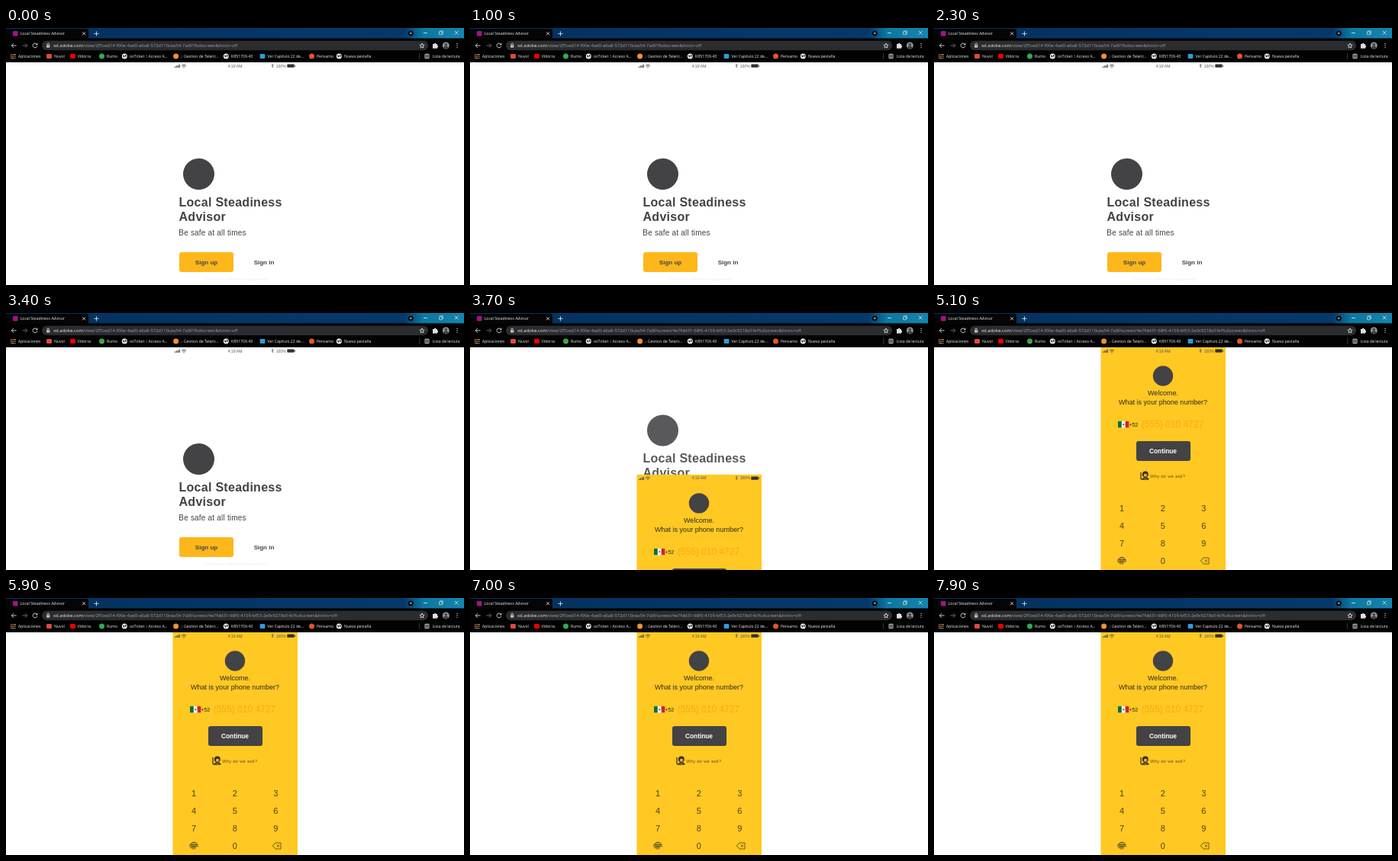
These frames come from a looping animation (600x337 px, 8000 ms). An HTML page:

```html
<!DOCTYPE html>
<html lang="en">
<head>
<meta charset="utf-8">
<title>App prototype</title>
<style>
html, body { margin: 0; width: 100%; height: 100%; overflow: hidden; background: #fff; }
svg { display: block; width: 100vw; height: 100vh; }
text { font-family: "Liberation Sans", Arial, sans-serif; }
.ui text { font: 5.1px "Open Sans", sans-serif; fill: #eee; }
.ui #url { font-size: 5.9px; fill: #9aa0a6; }
.line { fill: none; stroke: #ddd; stroke-width: .9; }
.mid { text-anchor: middle; }
.bold { font-weight: bold; font-size: 8px; }
</style>
</head>
<body>
<svg viewBox="0 0 600 337">
  <defs>
    <linearGradient id="strip">
      <stop offset="0" stop-color="#04315f"/>
      <stop offset=".87" stop-color="#05396b"/>
      <stop offset=".91" stop-color="#0b78a3"/>
      <stop offset="1" stop-color="#1584ae"/>
    </linearGradient>
    <clipPath id="page"><rect y="45" width="600" height="292"/></clipPath>
    <clipPath id="phone"><rect x="218.5" y="45" width="163.5" height="300"/></clipPath>
    <g id="status" fill="#555">
      <path d="M221 52v-1.5h1.3V52zm1.9 0v-2.4h1.3V52zm1.9 0v-3.2h1.3V52zm1.9 0v-4.2h1.3V52z"/>
      <path d="M230 49.3q3-2.9 6 0M231.2 50.5q1.8-1.7 3.6 0" fill="none" stroke="#555" stroke-width=".9"/>
      <circle cx="233" cy="51.7" r=".7"/>
      <text class="mid" x="300" y="51.6" font-size="5.2">4:19 AM</text>
      <path d="M347.8 48.3l2.6 2.4-1.3 1.2v-5l1.3 1.2-2.6 2.4" fill="none" stroke="#555" stroke-width=".6"/>
      <text x="353.8" y="51.6" font-size="5">100%</text>
      <rect x="368.3" y="47.6" width="9.4" height="4.2" rx=".8" fill="#333"/>
      <rect x="378.2" y="48.8" width=".9" height="1.8" fill="#333"/>
    </g>
  </defs>
  <rect width="600" height="337" fill="#fff"/>

  <g clip-path="url(#page)">
    <g id="start" fill="#434345">
      <use href="#status"/>
      <circle cx="252.5" cy="191.5" r="20.5"/>
      <g font-size="16" font-weight="bold" letter-spacing=".28">
        <text x="226.5" y="233.5">Local Steadiness</text>
        <text x="226.5" y="252.5">Advisor</text>
      </g>
      <text x="226.3" y="272" font-size="10" letter-spacing=".2">Be safe at all times</text>
      <rect x="227" y="294" width="71" height="26" rx="3" fill="#fdb71a"/>
      <text class="mid bold" x="262.5" y="309.5">Sign up</text>
      <text class="mid bold" x="338" y="309.5">Sign in</text>
      <text class="mid" x="301" y="331" font-size="6" letter-spacing=".3" fill="#ececec">Continue without registering</text>
    </g>

    <g id="login" fill="#2c2a25">
      <rect x="218.5" y="45" width="163.5" height="300" fill="#ffc822"/>
      <use href="#status" clip-path="url(#phone)"/>
      <circle cx="300" cy="82.5" r="13.2" fill="#434345"/>
      <text class="mid" x="300" y="108" font-size="9.05">Welcome.</text>
      <text class="mid" x="300" y="120" font-size="9.05">What is your phone number?</text>
      <rect x="241" y="142" width="14.4" height="8.4" fill="#fff"/>
      <rect x="241" y="142" width="4.8" height="8.4" fill="#08703f"/>
      <rect x="250.6" y="142" width="4.8" height="8.4" fill="#d4202c"/>
      <circle cx="248.2" cy="146.2" r="1.2" fill="#77714a"/>
      <text x="255.4" y="148.7" font-size="7">+52</text>
      <text x="271.7" y="150" font-size="12" fill="#f9a91b">(555) 010 4727</text>
      <rect x="265" y="168" width="71" height="26" rx="3" fill="#434345"/>
      <text class="mid bold" x="300" y="183.6" style="font-size:8.3px;fill:#fff">Continue</text>
      <g stroke="#33281c" fill="none">
        <path d="M271 209v7.5q0 1.7 2 1.7h8" stroke-width="1.2"/>
        <circle cx="276.8" cy="211.5" r="3.9" fill="#33281c" stroke="none"/>
        <circle cx="277" cy="212.6" r="2.2" fill="#e7a93a" stroke="none"/>
        <path d="M273 218q4-4 8.4 0" stroke-width="1.3"/>
      </g>
      <text x="283" y="215.8" font-size="6" letter-spacing=".16" fill="#66521d">Why do we ask?</text>
      <g id="keys" class="mid" font-size="11" fill="#4b4127"></g>
      <g fill="none" stroke="#4b4127" stroke-width=".8">
        <path d="M353 321h7v8h-7l-3.6-4zm1.8 2.3l3.2 3.4m0-3.4l-3.2 3.4"/>
        <path d="M241 327a5.3 5.3 0 1 1 10.3-.5M242.6 328.5q0-7.8 3.4-7.8t3.4 5.6M244.3 329.5q0-6.8 1.7-6.8t1.7 6.8M246 324.5v5M240.8 323.5h10M242 326h8.5"/>
      </g>
    </g>
  </g>

  <g class="ui">
    <rect width="600" height="45" fill="#020202"/>
    <rect width="600" height="13.5" fill="url(#strip)"/>
    <path d="M0 14V1h105q3 0 3 3v10z" fill="#050506"/>
    <rect x="9" y="4" width="6.5" height="6.5" rx="1" fill="#a3128a"/>
    <text x="18.7" y="9.2">Local Steadiness Advisor</text>
    <g class="line">
      <path d="M100 5.3l4 4m0-4l-4 4M118.5 4.4v6m-3-3h6"/>
      <path d="M547 6.5h5M588 4l4.4 4.4m0-4.4L588 8.4"/>
      <path d="M567.5 5h3.7v3.7h-3.7zM568.7 5V3.8h3.7v3.7h-1.2" stroke-width=".7"/>
      <path d="M13.5 23H7.2m2.8-2.8L7.2 23l2.8 2.8"/>
      <path d="M21.5 23h6.3m-2.8-2.8l2.8 2.8-2.8 2.8" stroke="#777"/>
      <path d="M40.5 21.4a2.9 2.9 0 1 0 .4 2.2M41 19.8v2.1h-2.2"/>
    </g>
    <circle cx="530.3" cy="7" r="3.6" fill="#0a1016"/>
    <path d="M528.7 6.2h3.2l-1.6 2z" fill="#ddd"/>
    <rect x="47" y="16.8" width="506" height="12.4" rx="6.2" fill="#2b2c2f"/>
    <path d="M53 22.3h4.4v3.4H53z" fill="#bbb"/>
    <path class="line" d="M54 22.3v-1a1.2 1.2 0 0 1 2.4 0v1" stroke-width=".7"/>
    <text id="url" x="62" y="25.1"><tspan fill="#eee">xd.adobe.com</tspan><tspan id="path"></tspan></text>
    <path class="line" d="M545 20l.9 2.1 2.2.2-1.7 1.5.5 2.2-1.9-1.2-1.9 1.2.5-2.2-1.7-1.5 2.2-.2z" stroke-width=".7"/>
    <path d="M559 21h2a1.2 1.2 0 0 1 2.4 0h1.6v2a1.2 1.2 0 0 1 0 2.4v1.3h-6z" fill="#ddd"/>
    <circle cx="576.3" cy="23" r="4.5" fill="#8d9496"/>
    <path d="M573 26q.5-2.4 3.3-2.4t3.3 2.4a4.5 4.5 0 0 1-6.6 0z" fill="#3b4143"/>
    <circle cx="576.3" cy="21.8" r="1.7" fill="#3b4143"/>
    <g fill="#ddd"><circle cx="591" cy="20.4" r=".7"/><circle cx="591" cy="23" r=".7"/><circle cx="591" cy="25.6" r=".7"/></g>
    <g id="marks"></g>
    <path d="M541.7 33v8" stroke="#555" stroke-width=".7"/>
    <path class="line" d="M549 34.3h5v5.4h-5zM550 36h3m-3 2h3" stroke-width=".8"/>
    <text x="558.7" y="38.8">Lista de lectura</text>
  </g>
</svg>
<script>
const $ = id => document.getElementById(id);

$("keys").innerHTML = [..."1234567890"].map((key, i) => {
  const col = key === "0" ? 1 : i % 3;
  return `<text x="${246 + col * 53.7}" y="${260 + Math.floor(i / 3) * 23}">${key}</text>`;
}).join("");

const dots = ["#e8453c", "#e8453c", "#f2b90f", "#4a8df0", "#e8453c", "#3ba55c", "#e8453c", "#f2b90f", "#4a8df0"]
  .map((c, i) => `<rect x="${6 + i % 3 * 2.4}" y="${34 + Math.floor(i / 3) * 2.4}" width="1.6" height="1.6" fill="${c}"/>`).join("");
const disc = (x, c) => `<circle cx="${x}" cy="37" r="3.5" fill="${c}"/>`;
const box = (x, c) => `<rect x="${x - 3.4}" y="34" width="6.8" height="6" rx="1" fill="${c}"/>`;
const globe = x => disc(x, "#eee") +
  `<path d="M${x - 2.5} 35.5l2 .4.6 1.6-1.2 1.6zm3.4-.8l1.8 1.6-1 1.7-1.4-1z" fill="#333"/>`;
$("marks").innerHTML = [
  [dots, 16, "Aplicaciones"],
  [box(56.5, "#e04a3f"), 63, "Nuvol"],
  [box(87.5, "#f00000"), 93.8, "Vidorra"],
  [disc(125.5, "#35a853"), 132, "Rumo"],
  [globe(155.3), 162, "osTicket :: Acceso A..."],
  [disc(222.6, "#f0932b"), 229, ".: Gestion de Talent..."],
  [globe(288.3), 295, "KR5170X-40"],
  [box(336, "#2f9bd8"), 342.6, "Ver Capítulo 22 de..."],
  [disc(400.5, "#e5532d"), 407, "Pensamo"],
  [globe(436.3), 443, "Nueva pestaña"],
].map(([icon, x, label]) => `${icon}<text x="${x}" y="38.8">${label}</text>`).join("");

const LOOP = 8000, SLIDE_AT = 3640, SLIDE = 250, HEIGHT = 292;
const paths = [
  "/view/2f5ced14-f90e-4ad0-a6a8-572d110cea54-7a0f/?fullscreen&hints=off",
  "/view/2f5ced14-f90e-4ad0-a6a8-572d110cea54-7a0f/screen/4e7fdd31-68f5-4159-bf53-2e9c9218d1fe?fullscreen&hints=off",
];

function draw(now) {
  const t = now % LOOP;
  const k = Math.min(1, Math.max(0, (t - SLIDE_AT) / SLIDE));
  const p = 1 - (1 - k) ** 2;
  $("login").setAttribute("transform", `translate(0 ${HEIGHT * (1 - p)})`);
  // The screen below drifts up more slowly and fades as it is covered.
  $("start").setAttribute("transform", `translate(0 ${-0.3 * HEIGHT * p})`);
  $("start").setAttribute("opacity", p < 1 ? 1 - 0.28 * p : 0);
  $("path").textContent = paths[t < SLIDE_AT ? 0 : 1];
}

const begin = performance.now();
function tick() {
  draw(performance.now() - begin);
  requestAnimationFrame(tick);
}
tick();
</script>
</body>
</html>
```
